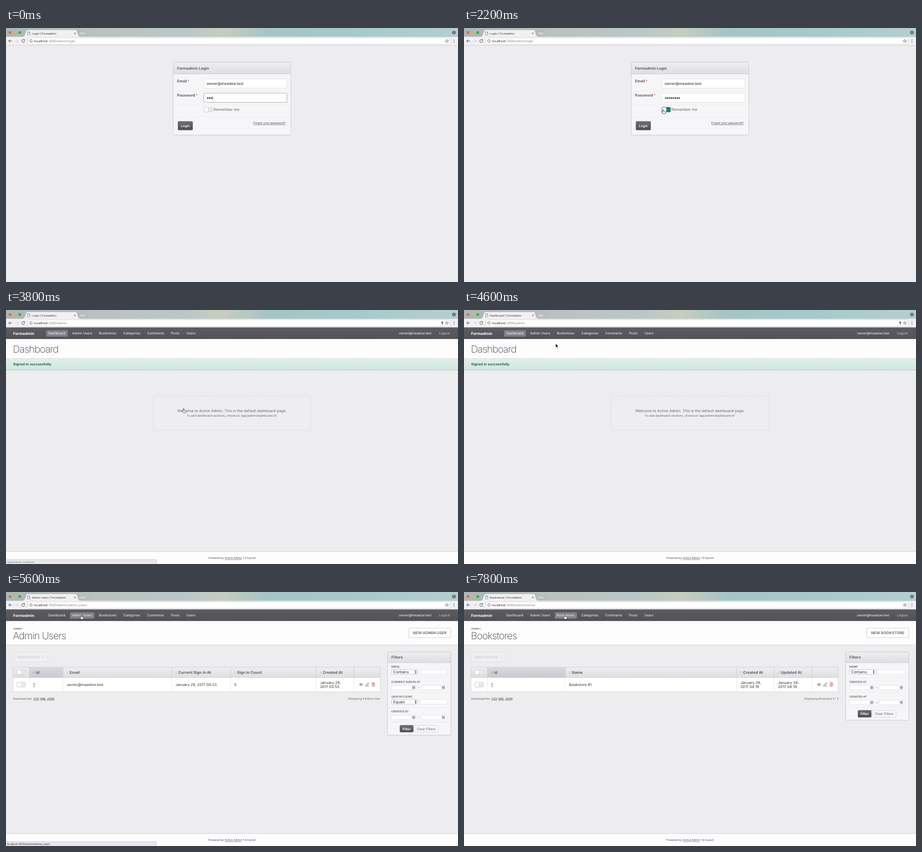
An HTML page that plays this animation: 888 by 500 pixels, repeating every 8000 ms.

```html
<!DOCTYPE html>
<html lang="en">
<head>
<meta charset="utf-8">
<title>Admin login</title>
<style>
  html, body { margin: 0; width: 100%; height: 100%; overflow: hidden; background: #edecee; }
  svg { display: block; width: 888px; height: 500px; }
  text { font-family: Inter, "Open Sans", sans-serif; text-rendering: geometricPrecision; white-space: pre; }
  .bold { font-weight: 700; }
  .semi { font-weight: 600; }
  .thin { font-weight: 200; letter-spacing: -.9px; }
  .link { text-decoration: underline; }
</style>
</head>
<body>
<svg viewBox="0 0 888 500">
  <defs>
    <linearGradient id="sky">
      <stop offset="0" stop-color="#a9b8b7"/><stop offset=".2" stop-color="#bac1c0"/>
      <stop offset=".4" stop-color="#b9c8c7"/><stop offset=".48" stop-color="#c6cdbc"/>
      <stop offset=".58" stop-color="#a4c5c6"/><stop offset=".78" stop-color="#a5cacc"/>
      <stop offset="1" stop-color="#b3cfcf"/>
    </linearGradient>
    <linearGradient id="head" x2="0" y2="1"><stop stop-color="#efeef1"/><stop offset="1" stop-color="#dedde1"/></linearGradient>
    <linearGradient id="sorted" x2="0" y2="1"><stop stop-color="#dad9dd"/><stop offset="1" stop-color="#c9c9ce"/></linearGradient>
    <linearGradient id="dark" x2="0" y2="1"><stop stop-color="#6c7074"/><stop offset="1" stop-color="#4a4d51"/></linearGradient>
    <linearGradient id="hover" x2="0" y2="1"><stop stop-color="#45494c"/><stop offset="1" stop-color="#383b3e"/></linearGradient>
    <linearGradient id="nav" x2="0" y2="1"><stop stop-color="#5b5d62"/><stop offset="1" stop-color="#505257"/></linearGradient>
    <linearGradient id="flash" x2="0" y2="1"><stop stop-color="#e0eeea"/><stop offset="1" stop-color="#d2e8e1"/></linearGradient>
  </defs>
  <g id="stage"></g>
</svg>
<script>
const STEP = 200, LOOP = 8000;
const EMAIL = 'owner@meadow.test';
const INK = '#5e6469';
const stage = document.getElementById('stage');

const text = (x, y, size, str, fill = '#333', cls = '', anchor = 'start') =>
  `<text x="${x}" y="${y}" font-size="${size}" fill="${fill}" class="${cls}" text-anchor="${anchor}">${str}</text>`;
const rect = (x, y, w, h, fill, stroke = 'none', r = 0, extra = '') =>
  `<rect x="${x}" y="${y}" width="${w}" height="${h}" rx="${r}" fill="${fill}" stroke="${stroke}" stroke-width=".7" ${extra}/>`;
const path = (d, stroke, width = .8, fill = 'none') =>
  `<path d="${d}" stroke="${stroke}" stroke-width="${width}" fill="${fill}"/>`;
const circle = (x, y, r, fill, stroke = 'none') =>
  `<circle cx="${x}" cy="${y}" r="${r}" fill="${fill}" stroke="${stroke}" stroke-width=".8"/>`;
const at = (x, y, content, turn = 0) => `<g transform="translate(${x} ${y}) rotate(${turn})">${content}</g>`;
const hline = (x1, x2, y, color) => path(`M${x1} ${y}H${x2}`, color, .7);

const PAGES = {
  login: { title: 'Login', url: '/admin/login' },
  dashboard: { title: 'Dashboard', url: '/admin' },
  users: {
    title: 'Admin Users', url: '/admin/admin_users', button: 'NEW ADMIN USER',
    columns: [[112, 'Email', EMAIL], [325.5, 'Current Sign In At', 'January 29, 2017 04:23'],
      [441, 'Sign In Count', '5'], [609.5, 'Created At', 'January 29,|2017 03:55']],
    summary: 'Displaying <tspan class="bold">1</tspan> Admin User',
    filters: [['EMAIL', 'Contains'], ['CURRENT SIGN IN AT'], ['SIGN IN COUNT', 'Equals'], ['CREATED AT']]
  },
  stores: {
    title: 'Bookstores', url: '/admin/stores', button: 'NEW BOOKSTORE',
    columns: [[199, 'Name', 'Bookstore #1'], [535.5, 'Created At', 'January 29,|2017 04:19'],
      [609.5, 'Updated At', 'January 29,|2017 04:19']],
    summary: 'Displaying Bookstore <tspan class="bold">1 - 1</tspan>',
    filters: [['NAME', 'Contains'], ['CREATED AT'], ['UPDATED AT']]
  }
};
const MENU = [[83, 'Dashboard', 34], [130, 'Admin Users', 39.5], [182.5, 'Bookstores', 35],
  [230.5, 'Categories'], [277.5, 'Comments'], [324, 'Posts'], [354.5, 'Users']];

function browser(page, tabTitle, loading, n) {
  const key = page === 'dashboard' ? circle(857, 24.2, 1.7, '#555') + path('M857 25v4M857 27.5h1.4', '#555', 1) : '';
  const tabIcon = loading
    ? at(44.8, 10.5, path('M0-3A3 3 0 0 1 3 0', '#999', .8), n * 90 - 80)
    : path('M42.5 7.4h2.6l1.8 1.8v4.4h-4.4zM45 7.4v2h2', '#666', .7, '#fff');
  const reload = loading
    ? path('M31.4 22.9l5.2 5.2M36.6 22.9l-5.2 5.2', '#555', 1)
    : path('M36.3 23.8A2.9 2.9 0 1 0 36.8 26', '#555', 1) + path('M37 22v2.8h-2.8z', 'none', 0, '#555');
  return rect(0, 0, 888, 17.5, 'url(#sky)') +
    [[8, '#fc5b57'], [17.5, '#e5b43c'], [27, '#32b146']].map(([x, c]) => circle(x, 9, 2.8, c)).join('') +
    path('M143 7.5h11.5q1 0 1.5 1l2.4 5.5h-11.2q-1.2 0-1.7-1z', '#9aa5a5', .7, '#c8cfcf') +
    rect(0, 17, 888, 17.3, '#f2f0f2') + hline(0, 888, 17, '#b4b9b9') +
    path('M33 17.4q2.4-.4 3.2-2.4l3.4-9.3q.8-2 2.8-2h94q2 0 2.8 2l3.4 9.3q.8 2 3.2 2.4z', '#adb4b4', .6, '#f2f0f2') +
    rect(33, 17, 113, 1.2, '#f2f0f2') + hline(0, 888, 34.2, '#c9c7ca') +
    tabIcon + text(51, 12.5, 5.45, `${tabTitle} | Formadmin`) +
    path('M133.6 8.8l3.6 3.6M137.2 8.8l-3.6 3.6', '#555', .8) +
    circle(880, 9, 3.4, '#555b5c') + circle(880, 7.9, 1.1, '#c3d5d5') + path('M877.8 11q2.2-2.2 4.4 0z', 'none', 0, '#c3d5d5') +
    path('M11.7 25.5H5.4M8.3 22.5l-3 3 3 3', '#555', 1) +
    path('M17.8 25.5h6.3M21.2 22.5l3 3-3 3', '#cfcdd0', 1) + reload +
    rect(42.5, 19.3, 829.5, 12.8, '#fff', '#cfcdd0', 1.5) +
    circle(49, 25.5, 2.8, 'none', '#666') + path('M49 25v2.1M49 23.6v.8', '#666', .8) +
    text(55, 27.7, 6.27, `localhost<tspan fill="#858585">:3000${PAGES[page].url}</tspan>`, '#222') + key +
    path('M866.2 22.3l.9 2.2 2.3.1-1.8 1.5.6 2.3-2-1.3-2 1.3.6-2.3-1.8-1.5 2.3-.1z', '#555', .7) +
    [22.9, 25.5, 28.1].map(y => circle(880, y, .75, '#555')).join('');
}

// mode 0: off, 1: switching, 2: on
function toggle(x, y, mode = 0) {
  const [track, edge] = [['#e9e8eb', '#cfced2'], ['#16846e', '#16846e'], ['#0d7659', '#0d7659']][mode];
  return rect(x, y, 17, 9.3, track, edge, 1.2) +
    rect(mode === 2 ? x + 8.5 : x, y, mode === 2 ? 8.5 : 9, 9.3, mode === 2 ? '#eaf4f1' : '#fff', mode ? edge : '#bdbcc0', 1.2);
}

function panel(x, y, w, h, headHeight, title) {
  return rect(x, y + 1, w, h, 'none', '#dddce0', 2) + rect(x, y, w, h, '#f6f5f7', '#c9c8cc', 2) +
    rect(x, y, w, headHeight, 'url(#head)', '#c9c8cc', 2) +
    text(x + 7.3, y + headHeight / 2 + 2.8, 7.45, title, INK, 'bold');
}

function login(n) {
  const focused = n < 11, dots = Math.min(8, 3 + n);
  const label = (y, str, starX) => text(336, y, 7.4, str, INK, 'bold') + text(starX, y, 7, '*', '#e0594f');
  let out = panel(328.7, 67, 230.8, 143.4, 23.6, 'Formadmin Login') +
    [123.5, 151.5, 175.3].map(y => hline(329, 559, y, '#ebeaed')).join('') +
    label(107, 'Email', 357) + label(135, 'Password', 373) +
    rect(388.6, 100.2, 163.4, 18.2, '#fff', '#d8d7db', 1) + text(394, 112, 7.3, EMAIL, '#222') +
    rect(388.6, 128.3, 163.4, 18.2, '#fff', focused ? '#8f969c' : '#d8d7db', 1);
  for (let i = 0; i < dots; i++) out += circle(396.4 + i * 3.73, 138, 1.4, '#222');
  if (n < 6) out += path(`M${395.1 + dots * 3.73} 134v7.6`, '#333', .6);
  return out + toggle(388.7, 156, n < 11 ? 0 : n < 12 ? 1 : 2) +
    text(407.5, 163.4, 7.4, 'Remember me', '#66696d') +
    rect(338, 184, 28.6, 16.8, n < 14 ? 'url(#dark)' : 'url(#hover)', '#484b4e', 1.5) +
    text(352.3, 194.9, 6.5, 'Login', '#fff', 'semi', 'middle') +
    text(486, 189.4, 5.85, 'Forgot your password?', '#44484c', 'link');
}

function frame(page, hovered) {
  const tall = page !== 'dashboard', bottom = tall ? 104 : 95.7;
  const items = MENU.map(([x, label, w]) =>
    (label === PAGES[page].title || label === hovered ? rect(x - 4.2, 40, w + 8.6, 12.4, '#808287', 'none', 1.8) : '') +
    text(x, 48.4, 6.5, label, '#fff')).join('');
  return rect(0, 34.3, 888, 23, 'url(#nav)') + text(14, 48.6, 7.55, 'Formadmin', '#fff', 'bold') + items +
    text(772, 48.4, 6.42, EMAIL, '#fff') + text(850.5, 48.4, 6.5, 'Logout', '#cfd0d2') +
    rect(0, 57.3, 888, bottom - 57.3, '#fefdfe') + hline(0, 888, bottom, '#c9c8cc') +
    text(13.5, tall ? 92.6 : 84.2, 19.5, PAGES[page].title, '#3c3f42', 'thin') +
    rect(0, 475.6, 888, 24.4, '#fefdfe') + hline(0, 888, 475.5, '#c5c4c8') +
    text(444, 490, 5.43, 'Powered by <tspan class="link">Active Admin</tspan> 1.0.0.pre4', '#44484c', '', 'middle');
}

function dashboard() {
  return rect(0, 96, 888, 22, 'url(#flash)') + hline(0, 888, 118, '#8fb5a8') +
    text(14, 109.2, 6.8, 'Signed in successfully.', '#17664f', 'bold') +
    rect(289.4, 169, 309.2, 67, '#eeedf0', '#d2d1d6', 2, 'stroke-dasharray="1.6 1.2"') +
    text(444, 200.6, 7.32, 'Welcome to Active Admin. This is the default dashboard page.', '#66696d', '', 'middle') +
    text(444, 210.2, 5.87, "To add dashboard sections, checkout 'app/admin/dashboard.rb'", '#66696d', '', 'middle');
}

const sortMark = x => path(`M${x - 1.2} 157.4l1.2-1.5 1.2 1.5zM${x - 1.2} 159l1.2 1.5 1.2-1.5z`, 'none', 0, '#a9a9ae');
const calendar = (x, y) => rect(x - 2.5, y - 2.3, 5, 4.8, '#d6d6d9', '#85888c', .4) +
  path(`M${x - 2.5} ${y - 1}h5M${x - 2.5} ${y + .7}h5M${x - .8} ${y - 1}v3.4M${x + .9} ${y - 1}v3.4`, '#85888c', .5);

function sidebar(filters) {
  const input = (x, y, w) => rect(x, y, w, 9, '#fff', '#d9d8dc', .8);
  const end = 139 + filters.length * 29.4;
  let out = panel(749.7, 118, 124, end + 25 - 118, 21.3, 'Filters');
  filters.forEach(([label, select], i) => {
    const y = 147.2 + i * 29.4;
    out += text(757, y + 2, 5.5, label, INK, 'semi');
    if (i) out += hline(750, 873.5, y - 8, '#e9e8eb');
    if (select) {
      out += rect(757, y + 5.7, 52, 9.2, '#fff', '#b5b4b8', 1.5) + text(760.8, y + 13, 7.3, select, '#222') +
        path(`M803 ${y + 9.4}l1.9-2.5 1.9 2.5zM803 ${y + 11.3}l1.9 2.5 1.9-2.5z`, 'none', 0, '#333') +
        input(814, y + 5.7, 53);
    } else {
      out += input(757, y + 7, 48.5) + input(815.5, y + 7, 50.5) + calendar(800.8, y + 11.3) + calendar(859.4, y + 11.3) +
        text(811.2, y + 13.5, 6.5, '-', '#555', '', 'middle');
    }
  });
  return out + hline(750, 873.5, end - .3, '#e3e2e6') +
    rect(774, end + 5.8, 26, 13.4, 'url(#dark)', '#484b4e', 1.5) + text(787, end + 14.9, 6.4, 'Filter', '#fff', 'bold', 'middle') +
    rect(802.2, end + 5.8, 46.8, 13.4, '#f7f6f8', '#cfced2', 1.5) + text(825.6, end + 14.9, 6.5, 'Clear Filters', INK, '', 'middle');
}

function list({ button, columns, summary, filters }) {
  const first = columns[0][0], tops = [46, first, ...columns.slice(1).map(c => c[0]), 683.7];
  let out = text(14, 73.7, 4.75, 'ADMIN /', '#5e6469', 'semi') +
    rect(791.3, 71, 82.4, 19, '#fff', '#bfbec2', 1) + text(832.5, 83.2, 7.4, button, '#72767a', 'bold', 'middle') +
    rect(14, 118.3, 68, 19.2, '#efeef1', '#dfdee2', 2) + text(22, 130.4, 6.6, 'Batch Actions', '#d0cfd4', 'bold') +
    path('M71.8 127.3h3l-1.5 1.9z', 'none', 0, '#d0cfd4') +
    rect(14, 148, 721, 20.4, 'url(#head)', '#c5c4c9') + rect(46, 148, first - 46, 20.4, 'url(#sorted)') +
    rect(14, 168.4, 721, 28.1, '#fff', '#cfced2') +
    tops.map(x => path(`M${x} 148v20.4`, '#c5c4c9', .7) + path(`M${x} 168.4v28`, '#e4e3e7', .7)).join('') +
    toggle(21.4, 153.2) + toggle(21.4, 177.8) +
    path('M53.4 157.6h3l-1.5 1.9z', 'none', 0, '#777') + text(59, 161, 7.45, 'Id', INK, 'bold') +
    text(53.6, 185, 7.3, '1', '#333', 'link');
  for (const [x, heading, value] of columns) {
    const lines = value.split('|');
    out += sortMark(x + 8.5) + text(x + 12.8, 161, 7.5, heading, INK, 'bold') +
      lines.map((line, i) => text(x + 7.4, lines.length > 1 ? 181 + i * 8 : 185, 7.25, line)).join('');
  }
  const link = (x, str) => text(x, 211.7, 5.4, str, '#333', 'link');
  return out +
    path('M694 182.2q3.4-4.6 7 0q-3.6 4.4-7 0z', '#44484c', .8) + circle(697.5, 182, 1.1, '#44484c') +
    path('M706.7 185.4l.5-2.2 4.2-4.4 1.6 1.6-4.3 4.3zM710.3 185.4h2.7', '#44484c', .8) +
    path('M718.2 179.7h6.8M720.3 179.5v-1.2h2.6v1.2M719 179.9l.4 5.6h4.4l.4-5.6M720.9 181.3v2.9M722.4 181.3v2.9', '#cf5340', .8) +
    text(14, 211.7, 5.4, 'Download this:', '#55595d') + link(54, 'CSV') + link(67, 'XML') + link(80.4, 'JSON') +
    text(735, 211.7, 5.5, summary, '#66696d', '', 'end') + sidebar(filters);
}

const status = (str, fill) => rect(-1, 491.6, 296.5, 9, '#e9e8eb', '#bdbcc0', .8) + text(2, 497.6, 5.08, str, fill);

// step, x, y, pointer is a hand
const TRACK = [[8, 425, 122, 0], [9, 404, 146, 0], [10, 391.4, 160.3, 1], [13, 366, 174, 0], [14, 349, 193.6, 1],
  [21, 322, 170, 0], [22, 250, 115, 0], [23, 180, 66, 0], [24, 147.8, 45.2, 1],
  [32, 158, 46, 1], [33, 184, 46, 1], [34, 198, 44.8, 1]];
const HAND = path('M-.9 .6q.9-1.2 1.7 0v3l2.6.6q1.2.4 1 1.7l-.7 2.7h-4.2l-2.1-3.1q-.3-1.2 1-.8l.7.7z', '#222', .7, '#fff');
const ARROW = path('M0 0v8l1.9-1.7 1.3 2.9 1.3-.6-1.3-2.8h2.5z', '#fff', .6, '#111');

function cursor(n) {
  const spot = TRACK.filter(([from]) => from <= n).pop();
  return spot ? at(spot[1], spot[2], spot[3] ? HAND : ARROW) : '';
}

function render(n) {
  const page = n < 19 ? 'login' : n < 28 ? 'dashboard' : n < 37 ? 'users' : 'stores';
  const loading = (n >= 17 && n < 19) || (n >= 26 && n < 28) || (n >= 35 && n < 37);
  const hovered = n >= 33 ? 'Bookstores' : n >= 24 ? 'Admin Users' : '';
  const tabTitle = n === 19 ? 'Login' : PAGES[page].title;
  let out = rect(0, 0, 888, 500, '#edecee') + browser(page, tabTitle, loading, n);
  if (page === 'login') out += login(n);
  else out += frame(page, hovered) + (page === 'dashboard' ? dashboard() : list(PAGES[page]));
  if (n === 19) out += status('Aguantando localhost...', '#777');
  if (n >= 24 && n < 30) out += status('localhost:3000/admin/admin_users', '#222');
  if (n >= 33 && n < 38) out += status('localhost:3000/admin/stores', '#222');
  stage.innerHTML = out + cursor(n);
}

let shown = -1;
function tick() {
  const n = Math.floor(performance.now() % LOOP / STEP);
  if (n !== shown) render(shown = n);
  requestAnimationFrame(tick);
}
tick();
</script>
</body>
</html>
```
